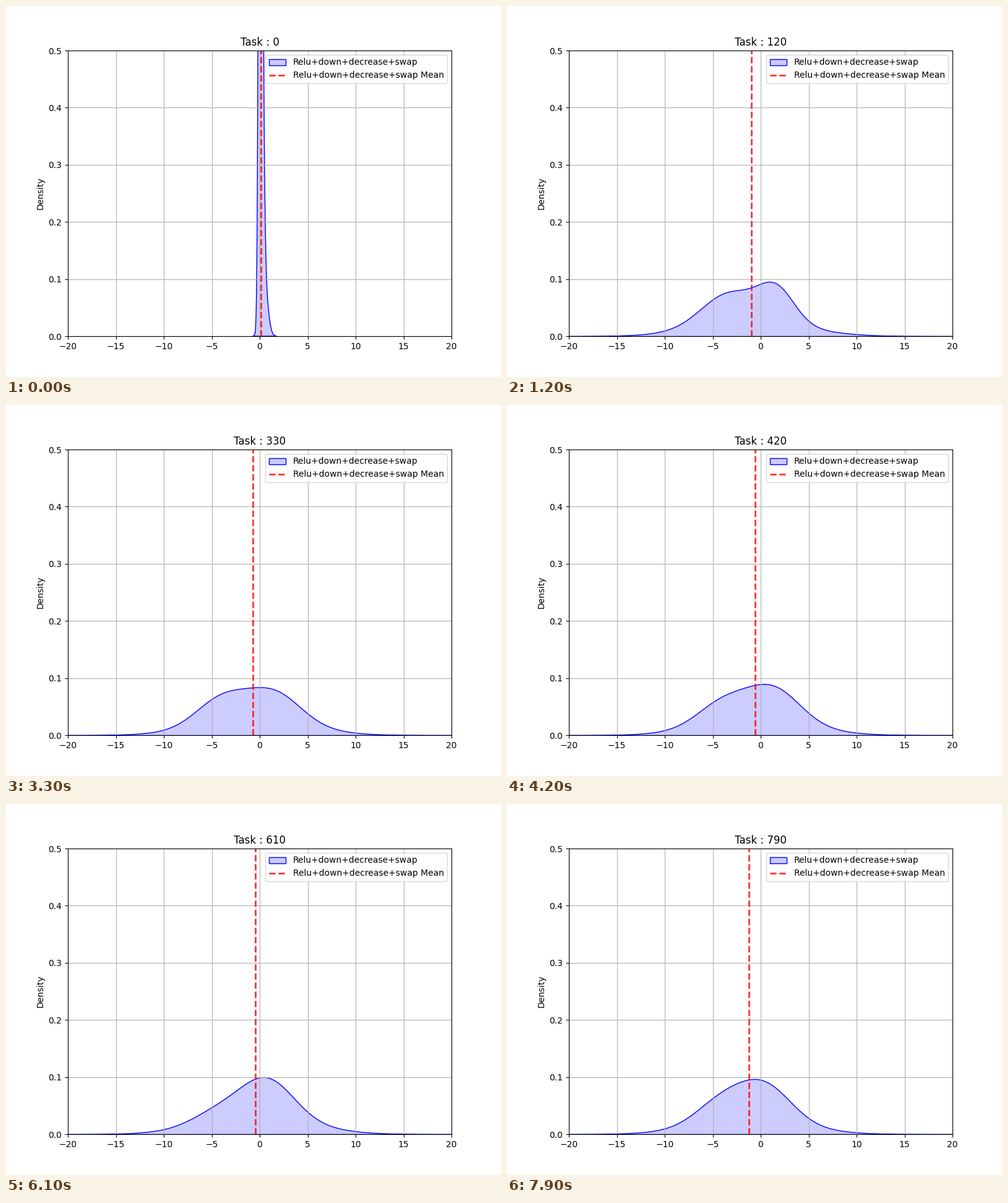
A matplotlib script that plays this animation: 800 px wide and 600 px high, repeating every 8 s.

```python
import matplotlib.pyplot as plt
import numpy as np
from matplotlib.animation import FuncAnimation
from matplotlib.colors import to_rgba

FRAMES, INTERVAL = 80, 100
NAME = "Relu+down+decrease+swap"
GRID = np.linspace(-24, 24, 1500)


def state(mean, left, left_share, right, right_share,
          spreads=(2.65, 2.75, 5.4), skew=0):
    """Mean, then centres, spreads and weights of a left, right and wide bell."""
    rest = 1 - left_share - right_share
    return np.array([mean, left, right, mean + skew, *spreads,
                     left_share, right_share, rest])


# Key poses: a narrow spike that spreads out, then drifts.
POSES = {
    0: state(.13, .08, .82, .35, .1, spreads=(.16, .18, .36), skew=.37),
    12: state(-.97, -3.4, .36, 1.6, .276, spreads=(2.8, 1.9, 5.4)),
    20: state(-1.68, -4, .265, .8, .37),
    33: state(-.7, -4, .288, 1.5, .345),
    52: state(-.43, -4, .2, 1.1, .445),
    61: state(-.43, -4.5, .12, .75, .455),
    79: state(-1.2, -4.2, .24, .4, .42),
}
STEPS = list(POSES)
SETTLED = STEPS[1]


def pose(step):
    """Blend the key poses; the first spread is fast, then slows."""
    if step < SETTLED:
        step = SETTLED * np.sqrt(step / SETTLED)
    return [np.interp(step, STEPS, column) for column in zip(*POSES.values())]


def density(params):
    """Outline of the bell mixture, without its negligible ends."""
    centers, spreads, weights = np.reshape(params, (3, 3, 1))
    z = (GRID - centers) / spreads
    bells = weights / (spreads * np.sqrt(2 * np.pi)) * np.exp(-z ** 2 / 2)
    y = bells.sum(axis=0)
    seen = y > y.max() * 1e-4
    return GRID[seen], y[seen]


fig, ax = plt.subplots(figsize=(8, 6), dpi=100)
area = ax.fill_between([0, 1], [0, 0], facecolor=to_rgba("blue", .2),
                       edgecolor="blue", linewidth=1, label=NAME)
mean_line = ax.axvline(0, color="red", linestyle="--", linewidth=2,
                       alpha=.8, label=NAME + " Mean")
ax.set(xlim=(-20, 20), ylim=(0, .5), ylabel="Density")
ax.grid(True)
ax.legend(loc="upper right")
title = ax.set_title("Task : 0")


def update(step):
    mean, *params = pose(step)
    x, y = density(params)
    outline = np.column_stack([x, y])
    area.set_verts([np.vstack([outline, [x[-1], 0], [x[0], 0]])])
    mean_line.set_xdata([mean, mean])
    title.set_text(f"Task : {step * 10}")
    return area, mean_line, title


anim = FuncAnimation(fig, update, frames=FRAMES, interval=INTERVAL,
                     repeat=True, repeat_delay=0, blit=False)
plt.show()
```
